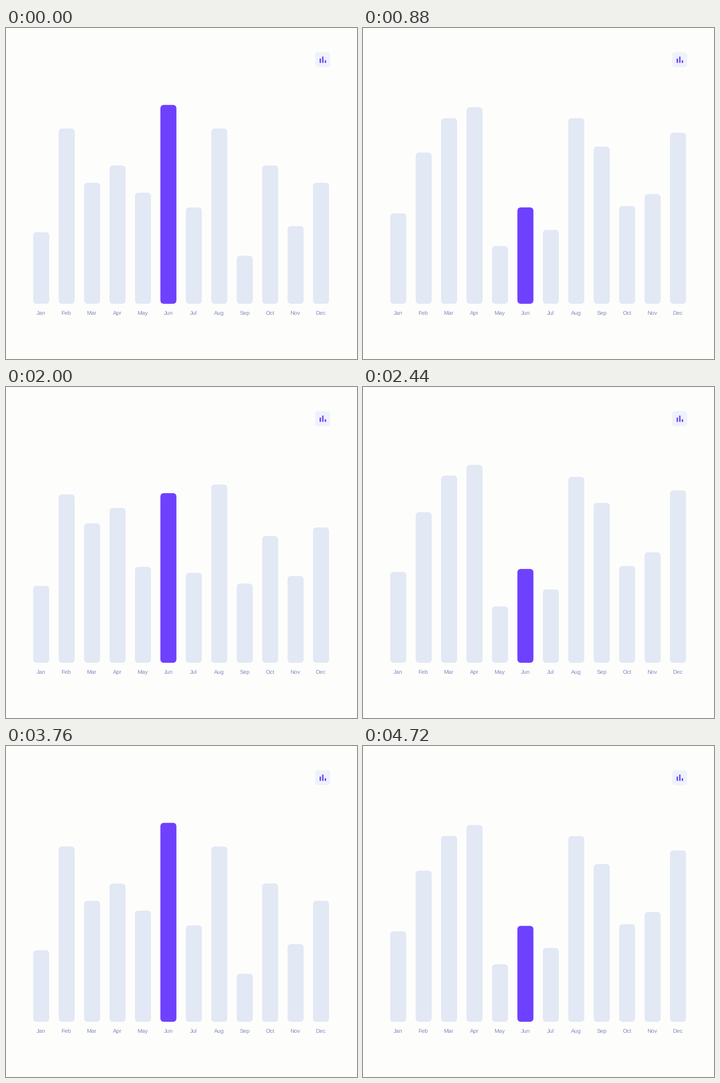
These frames come from a looping animation (771 by 726 pixels, 4.76 s). A matplotlib script:

```python
import math

import matplotlib.pyplot as plt
from matplotlib.animation import FuncAnimation
from matplotlib.patches import FancyBboxPatch

W, H, DPI = 771, 726, 128
STEP, FRAMES = 40, 119

BACK, TILE = "#fdfdfc", "#eef2fb"
BAR, ACCENT, LABEL = "#e2e8f4", "#6e41fe", "#7f8dbb"

MONTHS = "Jan Feb Mar Apr May Jun Jul Aug Sep Oct Nov Dec".split()
HIGHLIGHT = MONTHS.index("Jun")
LEFT, PITCH, BAR_W, BASE = 59.8, 55.87, 35.2, 604.9

# Top edges of the bars in the two data sets.
TOPS_A = [447.9, 220.4, 339.4, 301.6, 361.2, 168.7,
          393.6, 220.4, 499.5, 301.6, 434.4, 339.4]
TOPS_B = [406.6, 273.2, 197.8, 173.8, 478.4, 393.6,
          442.8, 197.8, 260.0, 390.6, 364.3, 229.6]

# Times in ms at which the chart springs to the other data set.
STARTS = [0, 888, 1903, 2948, 3990]
STIFFNESS, DAMPING = 100, 15


def spring(t):
    """Step response of an underdamped spring of mass 1, t in seconds."""
    decay = DAMPING / 2
    freq = math.sqrt(STIFFNESS - decay ** 2)
    wave = math.cos(freq * t) + decay / freq * math.sin(freq * t)
    return 1 - math.exp(-decay * t) * wave


def mix_at(ms):
    """Share of data set B shown at the given time."""
    k = max(i for i, start in enumerate(STARTS) if start <= ms)
    p = spring((ms - STARTS[k]) / 1000)
    return p if k % 2 == 0 else 1 - p


def rounded(x, y, w, h, r, color):
    box = FancyBboxPatch((x, y), w, h, linewidth=0, facecolor=color,
                         boxstyle=f"round,pad=0,rounding_size={r}")
    return ax.add_patch(box)


plt.rcParams["font.family"] = "Liberation Sans"
plt.rcParams["text.hinting"] = "none"

fig = plt.figure(figsize=(W / DPI, H / DPI), dpi=DPI, facecolor=BACK)
ax = fig.add_axes([0, 0, 1, 1])
ax.set_xlim(0, W)
ax.set_ylim(H, 0)
ax.axis("off")

# Chart icon
rounded(679, 53, 33, 32.7, 6.5, TILE)
for x, top in ((688.8, 66.8), (694.4, 62.4), (700.1, 70.6)):
    rounded(x, top, 3.1, 76.7 - top, 1.5, ACCENT)

bars = []
for i, (month, top) in enumerate(zip(MONTHS, TOPS_A)):
    x = LEFT + i * PITCH
    color = ACCENT if i == HIGHLIGHT else BAR
    bars.append(rounded(x, top, BAR_W, BASE - top, 8, color))
    ax.text(x + BAR_W / 2 - 0.4, 628.5, month, color=LABEL,
            fontsize=12.4 * 72 / DPI, ha="center", va="baseline")


def draw(frame):
    mix = mix_at(frame * STEP)
    for bar, a, b in zip(bars, TOPS_A, TOPS_B):
        top = a + (b - a) * mix
        bar.set_y(top)
        bar.set_height(BASE - top)
    return bars


anim = FuncAnimation(fig, draw, frames=FRAMES, interval=STEP,
                     repeat=True, repeat_delay=0, blit=False)
plt.show()
```
